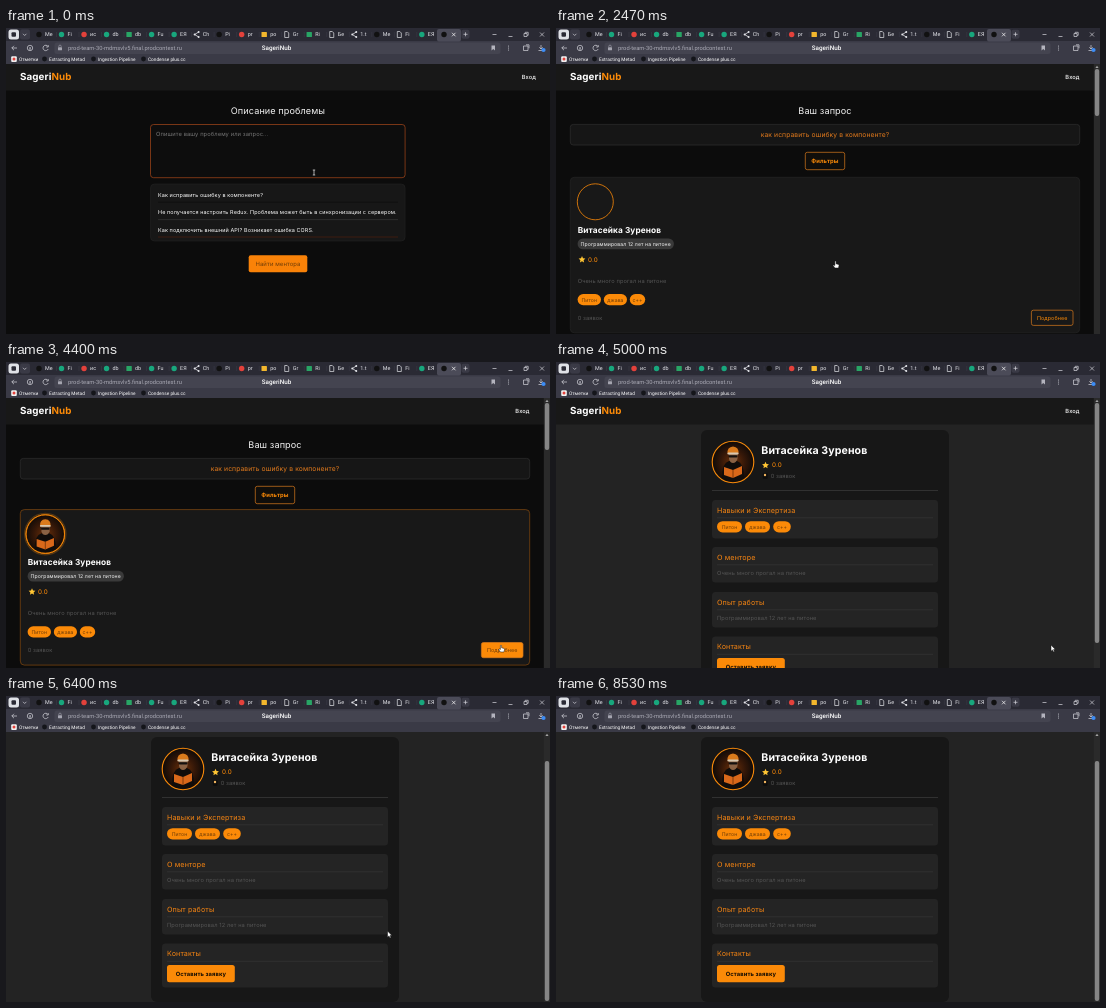
An HTML page for the animation above (8590 ms loop, 544 px wide and 306 px high).

```html
<!DOCTYPE html>
<html lang="ru">
<head>
<meta charset="utf-8">
<title>Demo</title>
<style>
html, body { margin: 0; width: 100%; height: 100%; overflow: hidden; background: #0c0c0c; }
svg { display: block; width: 100vw; height: 100vh; }
text { font-family: Inter, "Open Sans", sans-serif; letter-spacing: .1px; text-rendering: geometricPrecision; }
#chrome text { font-family: Roboto, "Noto Sans", sans-serif; letter-spacing: 0; }
</style>
</head>
<body>
<svg id="stage" viewBox="0 0 544 306" preserveAspectRatio="none"></svg>
<script>
const LOOP = 8590, STEP = 1000 / 15;
const ORANGE = '#fb8a08', GREY = '#555', INK = '#6e3c08';
const BRAND = ['Sageri', 'Nub'], MENTOR = 'Витасейка Зуренов';
const QUESTION = 'Как исправить ошибку в компоненте?';

const rect = (x, y, w, h, fill, rx = 0, extra = '') =>
  `<rect x="${x}" y="${y}" width="${w}" height="${h}" rx="${rx}" fill="${fill}" ${extra}/>`;
const text = (x, y, s, size, fill, extra = '') =>
  `<text x="${x}" y="${y}" font-size="${size}" fill="${fill}" ${extra}>${s}</text>`;
const path = (d, stroke, w = .7, extra = '') =>
  `<path d="${d}" fill="none" stroke="${stroke}" stroke-width="${w}" ${extra}/>`;
const dot = (x, y, r, fill, extra = '') => `<circle cx="${x}" cy="${y}" r="${r}" fill="${fill}" ${extra}/>`;
const rule = (x1, x2, y, color) => path(`M${x1} ${y}H${x2}`, color, .6);
const group = (id, body, extra = '') => `<g id="${id}" ${extra}>${body}</g>`;
const line = (color, w = .7) => `stroke="${color}" stroke-width="${w}"`;
const MID = 'text-anchor="middle"', BOLD = 'font-weight="700"', MEDIUM = 'font-weight="500"';

const star = (x, y) =>
  `<path d="M0-3.5L1-1.2 3.4-1 1.6.7 2.1 3 0 1.8-2.1 3-1.6.7-3.4-1-1-1.2Z" transform="translate(${x} ${y})" fill="#ffc533"/>`;

const tag = (x, y, w, s) =>
  rect(x, y, w, 11.2, ORANGE, 5.6) + text(x + w / 2, y + 7.5, s, 5.1, INK, MID);

const header = loginX =>
  rect(0, 36, 544, 26.5, '#181818') +
  `<text x="14" y="52.3" font-size="9.8" ${BOLD} fill="#fff">${BRAND[0]}<tspan fill="${ORANGE}">${BRAND[1]}</tspan></text>` +
  text(loginX, 51.2, 'Вход', 5.7, '#fff', MEDIUM);

// Reader with a cap and an orange book, about 40 units wide
const portrait =
  dot(0, 0, 20, 'url(#glow)') +
  '<path d="M-11 15Q-11 1-4-1H4Q11 1 11 15L6 19H-6Z" fill="#100c0a"/>' +
  '<path d="M-4-9H4.500V-3Q3 1 0 1Q-3 1-4-3Z" fill="#8a6244"/>' +
  '<path d="M-5.500-8.500Q-6-15 0-15.500Q6-15 5.500-8.500Z" fill="#d97a1c"/>' +
  rect(-5.6, -9.4, 11.2, 1.8, '#d8c8b0', .9) + rect(-4.4, -6.8, 8.8, 2.4, '#14100e', 1) +
  '<path d="M-9 5L0 8 9 4V12L0 16-9 13Z" fill="#d9681a"/>' +
  path('M0 8V16', '#6b2f07', .8);

function tabs() {
  const labels = 'Ме Fi ис db db Fu ЕЯ Ch Pi pr po Gr Ri Бе 1.t Ме Fi ЕЯ'.split(' ');
  const G = '#18a77d', R = '#e3413b', K = '#111', B = '#e4e5ea';
  const colors = [K, G, R, G, '#28a565', G, G, 'share', K, R, '#f3b72d', 'doc', '#28a565', 'doc', 'share', K, 'doc', G];
  return labels.map((s, i) => {
    const x = 33 + 22.52 * i, c = colors[i];
    let icon = dot(x, 6.5, 2.7, c);
    if (c === 'share') icon = path(`M${x + 2} 4L${x - 2} 6.500 ${x + 2} 9`, B, .8) + dot(x + 2, 4, 1, B) + dot(x - 2, 6.5, 1, B) + dot(x + 2, 9, 1, B);
    if (c === 'doc') icon = path(`M${x - 2} 3.500h2.500l1.500 1.500v4.500h-4Z`, B);
    if (i === 4 || i === 10 || i === 12) icon = rect(x - 2.7, 4, 5.4, 5, c, .6);
    return icon + text(x + 6, 8.4, s, 5.4, '#e4e5ea') + path(`M${x + 17.5} 4V9`, '#454551', .4);
  }).join('');
}

function chrome() {
  const C = '#d4d5dc';
  const marks = [[43, 'Extracting Metad'], [92, 'Ingestion Pipeline'], [142, 'Condense plus.cc']];
  return rect(0, 0, 544, 13, '#2a2a34') + rect(0, 13, 544, 23, '#3a3a46') +
    rect(2.5, 1.5, 10.5, 10, '#dfe1e6', 2.5) + rect(5.5, 4.2, 4.5, 4.6, '#2a2a34', 1) +
    rect(14, 1.5, 10, 10, '#3a3a46', 2) + path('M17 5.800L18.700 7.500 20.400 5.800', C) + tabs() +
    rect(431, 1, 24, 12.5, '#4b4b58', 2) + dot(438, 6.5, 2.7, '#111') + path('M446 4.800l3.500 3.500m0-3.500l-3.500 3.500', '#fff') +
    rect(455.5, 1.8, 8, 9, '#3a3a46', 2) + path('M457.500 6.300h4m-2-2v4', C) +
    path('M486.500 6.500h4M502.500 8.500h4M534 4.500l4 4m0-4l-4 4M518 5.500h3v3h-3ZM519.200 5.500v-1.200h3v3h-1.200', C) +
    rect(48.5, 14.5, 446, 11.5, '#444450', 2.5) +
    path('M11 20H5.800M8 17.800L5.800 20 8 22.200M42 18.500A2.700 2.700 0 1 0 42.200 21M42.200 17v2h-2', C) +
    dot(24, 20, 2.7, 'none', line(C)) + text(24, 21.6, 'Я', 4, C, MID) +
    rect(52, 19.3, 4, 3, '#a5a5b0', .5) + path('M52.800 19.300v-1a1.200 1.200 0 0 1 2.400 0v1', '#a5a5b0', .6) +
    text(62, 22.1, 'prod-team-30-mdmsvlv5.final.prodcontest.ru', 5.75, '#a9a9b4') +
    text(270.5, 22.1, BRAND.join(''), 6.3, '#fff', MID + ' ' + MEDIUM) +
    '<path d="M485.500 17.500h3.500v5l-1.750-1.400-1.750 1.400Z" fill="#b4b4be"/>' +
    dot(502.5, 18, .5, C) + dot(502.5, 20, .5, C) + dot(502.5, 22, .5, C) +
    path('M517.500 18h4.500v4.500h-4.500ZM520 16.800h3v3.500', C) +
    path('M535 17v4m-1.700-1.700l1.700 1.700 1.700-1.700M532.500 22.500h4', C) + dot(537.5, 22, 2.1, '#3d8df5') +
    rect(5.2, 28.3, 5.6, 5.6, '#f1f1f1', 1) + dot(8, 31, 1.5, '#e3413b') +
    text(13, 32.8, 'Отметки', 4.8, '#fff') +
    marks.map(([x, s]) => dot(x - 4.5, 31, 2.4, '#14151a') + text(x, 32.8, s, 4.75, '#fff')).join('');
}

function formPage() {
  const asks = [QUESTION,
    'Не получается настроить Redux. Проблема может быть в синхронизации с сервером.',
    'Как подключить внешний API? Возникает ошибка CORS.'];
  const rules = ['#0a0a0a', '#3c3c3c', '#5a210d'];
  return rect(0, 36, 544, 270, '#0c0c0c') + header(515.7) +
    text(272, 86, 'Описание проблемы', 9.1, '#f4f4f4', MID) +
    rect(144.5, 96.5, 254.6, 53.2, '#0d0d0d', 3, line('#a8481a')) +
    group('hint', text(150, 108.3, 'Опишите вашу проблему или запрос...', 5.75, '#757575')) +
    group('typed', text(150, 108.3, QUESTION, 5.9, '#fff', MEDIUM)) +
    rect(144.5, 156, 254.6, 57, '#171717', 4, line('#262626', .5)) +
    asks.map((s, i) => text(152, 169 + 17.4 * i, s, 5.45, '#fff') + rule(152, 392, 174.2 + 17.4 * i, rules[i])).join('') +
    rect(242.7, 227.2, 58.6, 17.1, ORANGE, 2, 'id="find"') +
    text(272, 237.9, 'Найти ментора', 5.9, INK, MID);
}

const scrollbar = (y, h, id) => rect(537.8, 36, 6.2, 270, '#2a2a2a') +
  '<path d="M539.400 40L541 37.800 542.600 40Z" fill="#a5a5a5"/>' + rect(538.8, y, 4.4, h, '#858585', 2, `id="${id}"`);

function resultPage() {
  const card = rect(14.3, 149.3, 509.4, 155.5, '#181818', 4, 'id="frame" stroke="#242424" stroke-width=".7"') +
    `<g transform="translate(39.300 173.800)"><g id="face">` +
    dot(0, 0, 18, '#181818', line(ORANGE, .8)) + group('photo', `<g transform="scale(.9)">${portrait}</g>` +
    dot(0, 0, 18.6, 'none', line(ORANGE, 2.6) + ' opacity=".25"') + dot(0, 0, 18, 'none', line(ORANGE, .9))) + '</g></g>' +
    text(21.7, 205.2, MENTOR, 8.3, '#fff', BOLD) +
    rect(21.6, 210.5, 96.3, 10.7, '#3a3a3a', 5.3) +
    text(69.7, 217.8, 'Программировал 12 лет на питоне', 5.15, '#f4f4f4', MID) +
    star(26, 231.5) + text(32, 233.6, '0.0', 6.3, ORANGE) +
    text(21.7, 255, 'Очень много прогал на питоне', 5.7, GREY) +
    tag(21.6, 266, 23.4, 'Питон') + tag(47.8, 266, 23.2, 'джава') + tag(73.8, 266, 15.4, 'c++') +
    text(21.7, 292, '0 заявок', 5.7, GREY) +
    rect(475.4, 282.2, 41.6, 15.2, ORANGE, 2, 'id="more" fill-opacity="0" ' + line('#d97a1e')) +
    text(496.2, 291.7, 'Подробнее', 5.4, ORANGE, MID + ' id="moreText"');
  return rect(0, 36, 544, 270, '#0c0c0c') + header(509.3) +
    text(269, 86, 'Ваш запрос', 9.1, '#f4f4f4', MID) +
    rect(14.3, 96.4, 509.4, 20.6, '#161616', 3, line('#2e2e2e')) +
    text(269, 108.9, QUESTION.toLowerCase(), 6.75, '#e27a1c', MID) +
    rect(249.3, 124.3, 39.4, 17.4, '#100e0b', 2, line('#d97a1e')) +
    text(269, 135, 'Фильтры', 5.8, ORANGE, MID + ' ' + BOLD) +
    group('card', card) + scrollbar(41, 47, 'bar1');
}

function profilePage() {
  const section = (y, h, title, body) =>
    rect(156, y, 226, h, '#242424', 3.5) + text(161, y + 12.6, title, 7.2, '#f58412') +
    rule(161, 377, y + 17.8, '#383838') + body;
  const note = (y, s) => text(161, y, s, 5.7, GREY);
  const body = header(509.3) + rect(145, 68, 248, 265, '#171717', 6) +
    `<g transform="translate(177 100)">${portrait}${dot(0, 0, 20.8, 'none', line(ORANGE, 1.1))}</g>` +
    text(205.3, 92.3, MENTOR, 10.6, '#fff', BOLD) +
    star(209.5, 103.2) + text(216, 105.4, '0.0', 6.3, ORANGE) +
    rect(206.8, 111.3, 4.8, 5.4, '#0c0c0c', 1) + dot(209, 113, 1.2, '#f2b661') +
    text(214.7, 116, '0 заявок', 5.7, GREY) + rule(156, 382, 128.5, '#444') +
    section(138, 38.4, 'Навыки и Экспертиза',
      tag(161, 159.2, 25, 'Питон') + tag(189, 159.2, 25, 'джава') + tag(217.2, 159.2, 17.6, 'c++')) +
    section(185, 35.5, 'О менторе', note(213, 'Очень много прогал на питоне')) +
    section(230, 35.5, 'Опыт работы', note(257.7, 'Программировал 12 лет на питоне')) +
    section(274.5, 44, 'Контакты', rect(161, 296, 67.8, 17.3, ORANGE, 2.5) +
      text(194.9, 306.7, 'Оставить заявку', 5.8, '#140c02', MID + ' ' + BOLD));
  return rect(0, 36, 544, 270, '#232323') + group('scroll', body) + scrollbar(41, 240, 'bar2');
}

const pointers =
  group('arrow', '<path d="M0 0V6.200L1.500 4.900 2.500 7 3.500 6.500 2.600 4.500H4.400Z" fill="#fff" stroke="#111" stroke-width=".5"/>') +
  group('hand', '<path d="M-.6.500Q0-.500.600.500V2.800L3 3.400Q3.600 3.600 3.500 4.500L3 7H-.600L-2.400 4.400Q-2.300 3.400-.600 4.400Z" fill="#fff" stroke="#111" stroke-width=".5"/>') +
  group('beam', path('M-1.200-2.500H1.200M0-2.500V2.500M-1.200 2.500H1.200', '#e8e8e8', .7));

document.getElementById('stage').innerHTML =
  '<defs><radialGradient id="glow"><stop offset="0" stop-color="#6b300a"/><stop offset=".6" stop-color="#341708"/><stop offset="1" stop-color="#120b07"/></radialGradient></defs>' +
  group('form', formPage()) + group('result', resultPage()) + group('profile', profilePage()) +
  group('chrome', chrome()) + group('cursor', pointers);

const $ = id => document.getElementById(id);
const show = (id, on) => $(id).setAttribute('display', on ? 'inline' : 'none');
const set = (id, name, value) => $(id).setAttribute(name, value);
const ease = x => x * x * (3 - 2 * x);
const ramp = (t, a, b) => ease(Math.min(1, Math.max(0, (t - a) / (b - a))));

// Time, x, y of the pointer tip
const route = [
  [70, 308, 144.5], [720, 214, 166], [930, 214, 166], [1400, 277, 219.5], [1730, 279.5, 233],
  [2530, 279.5, 233], [3270, 392, 226], [3400, 392, 226], [3670, 429.5, 240.5], [4200, 495, 283],
  [5000, 495, 283], [5400, 405, 252], [6130, 405, 252], [6400, 381.5, 235], [6930, 200, 279],
  [7200, 200, 279], [7930, 236, 312]
];

function pointerAt(t) {
  const i = route.findIndex(p => p[0] > t);
  if (i === 0) return route[0].slice(1);
  if (i < 0) return route[route.length - 1].slice(1);
  const [a, b] = [route[i - 1], route[i]], k = ramp(t, a[0], b[0]);
  return [a[1] + (b[1] - a[1]) * k, a[2] + (b[2] - a[2]) * k];
}

function draw(time) {
  const t = Math.floor((time + 5) / STEP) * STEP;
  const page = t < 2460 ? 'form' : t < 4925 ? 'result' : 'profile';
  ['form', 'result', 'profile'].forEach(id => show(id, id === page));

  const filled = t >= 860;
  show('hint', !filled);
  show('typed', filled);
  set('find', 'fill', filled ? ORANGE : '#f98208');

  const hover = ramp(t, 2510, 2810), press = ramp(t, 3980, 4270);
  set('card', 'transform', `translate(0 ${-1.7 * hover})`);
  set('frame', 'stroke', hover > .5 ? '#85490f' : '#242424');
  set('face', 'transform', `scale(${1 + .07 * hover})`);
  show('photo', t >= 2510);
  set('more', 'fill-opacity', press);
  set('moreText', 'fill', press > .5 ? INK : ORANGE);

  const scroll = ramp(t, 5540, 5870);
  set('scroll', 'transform', `translate(0 ${-27 * scroll})`);
  set('bar2', 'y', 41 + 24 * scroll);

  const [x, y] = pointerAt(t);
  const beam = page === 'form' && y < 150;
  const hand = !beam && (
    page === 'form' ? y > 227 || (y > 156 && y < 213) :
    page === 'result' ? y > 149 : x > 161 && x < 229 && y > 269 && y < 287);
  show('beam', beam);
  show('hand', hand);
  show('arrow', !beam && !hand);
  set('cursor', 'transform', `translate(${x} ${y})`);
}

const start = performance.now();
function tick() {
  draw((performance.now() - start) % LOOP);
  requestAnimationFrame(tick);
}
tick();
</script>
</body>
</html>
```
